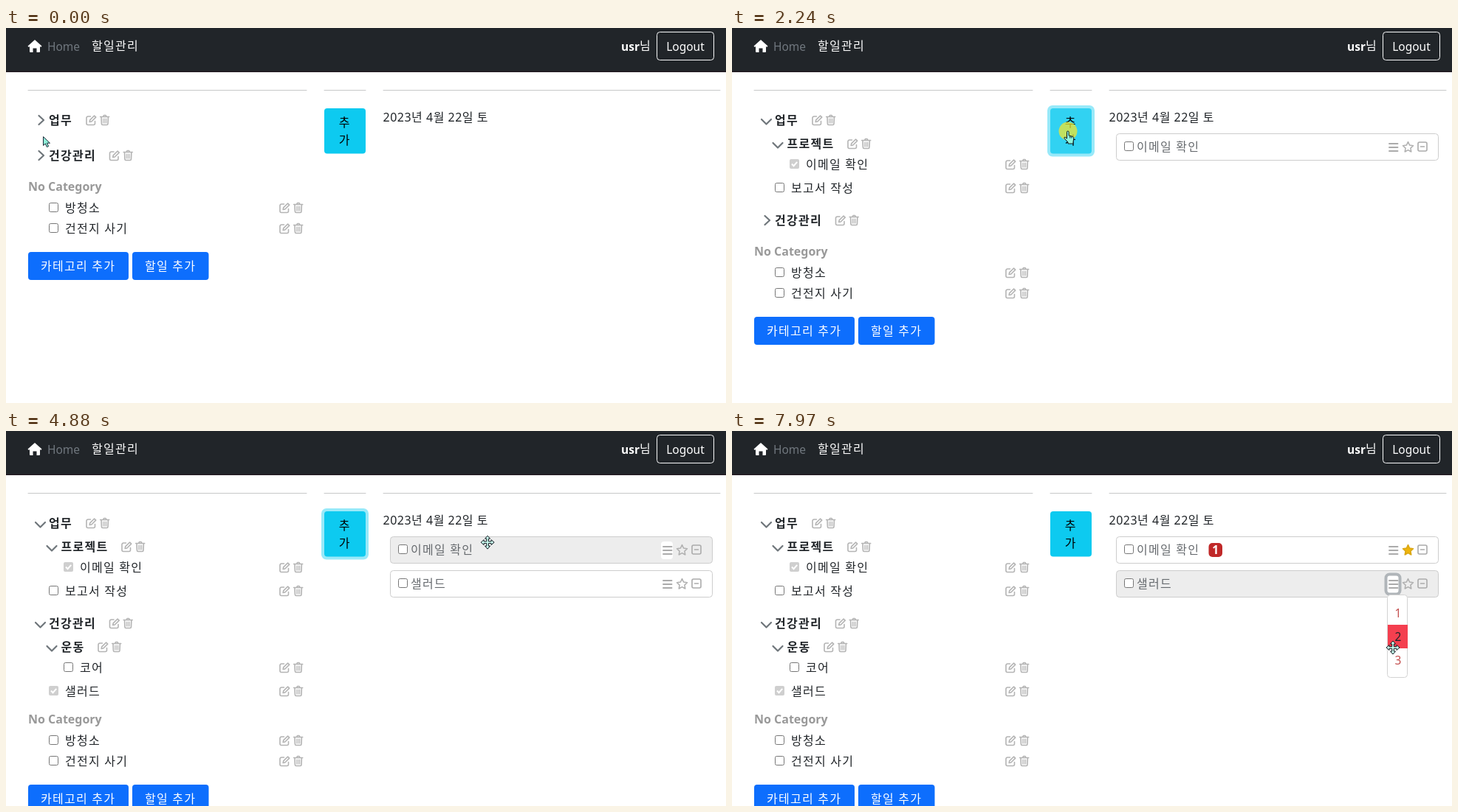
An HTML page for the animation above (8 s loop, 975 by 509 pixels).

```html
<!DOCTYPE html>
<html lang="ko">
<head>
<meta charset="utf-8">
<title>할일관리</title>
<style>
  html, body { margin: 0; width: 100%; height: 100%; overflow: hidden; background: #fff; }
  svg { display: block; width: 100vw; height: 100vh; }
  text { font: 16px "Noto Sans", "Noto Sans CJK KR", "Noto Sans CJK", sans-serif; letter-spacing: 1.25px; }
  text.latin { font-size: 15.5px; letter-spacing: 0; }
  text.plain { letter-spacing: 0; }
  text.date { letter-spacing: .5px; }
  text.bold { font-weight: 700; }
  .mid { text-anchor: middle; }
  .line { fill: none; stroke-linecap: round; stroke-linejoin: round; }
</style>
</head>
<body>
<svg viewBox="0 0 975 509">
  <defs>
    <g id="tools" class="line" stroke="#b4b4b4" stroke-width="1.6">
      <path d="M6.5 2.5H3a2 2 0 0 0-2 2V12a2 2 0 0 0 2 2h7.5a2 2 0 0 0 2-2V9"/>
      <path d="M5.2 10l.5-2.6L11.6 1.5l2.1 2.1-5.9 5.9z"/>
      <path d="M19.7 3h12M23.5 3l1-2h2.6l1 2M21 3l.4 9.5q.1 1.5 1.5 1.5h5.600q1.400 0 1.500-1.500L30.400 3"/>
      <path d="M23.7 5.500v6M25.7 5.500v6M27.7 5.500v6" stroke-width="1.1"/>
    </g>
    <path id="star" d="M0-7 2.1-2.4 7-1.8 3.4 1.6 4.3 6.5 0 4.1-4.3 6.5-3.4 1.6-7-1.8-2.1-2.4z" stroke-linejoin="round" stroke-width="1.5"/>
    <path id="arrow" d="M.5.5V12.5L3.3 10l2.1 4.6 2.2-1-2.1-4.4H9.5z" fill="#8ff0d8" stroke="#1c2b3a"/>
    <g id="hand" stroke="#101820">
      <path d="M-1.5 10V1.3a1.3 1.3 0 0 1 2.6 0V6l1.7.3 1.9.5 1.8.6q1.5.6 1.3 2.6L7 14.5V17H0v-2L-5 9.8q-.6-1.8 1.2-1.6z" fill="#8ff5dc"/>
      <path d="M2.8 6.5v3M5 7v2.5"/>
    </g>
    <path id="move" d="M0-9 3.5-5H1.3v3.7H5V-3.5L9 0 5 3.5V1.3H1.3V5h2.2L0 9l-3.500-4h2.200V1.300H-5v2.200L-9 0l4-3.500v2.200h3.700V-5h-2.200z" fill="#c9fbee" stroke="#101820"/>
  </defs>
  <g id="scene"></g>
</svg>
<script>
const LOOP = 8000;
const INK = '#212529', ICON = '#ababab';
const scene = document.getElementById('scene');

// Pointer path: time, x, y
const path = [
  [0, 50, 147], [100, 49, 143], [350, 46, 125], [830, 46, 125], [930, 48, 131], [1330, 87, 188],
  [1430, 85, 186], [1680, 86, 187], [2040, 455, 140], [2300, 455, 140], [2540, 330, 222],
  [2840, 62, 258], [3000, 45, 257], [3400, 45, 257], [3700, 64, 353], [3860, 64, 353],
  [4160, 403, 151], [4380, 455, 142], [4640, 455, 142], [5080, 800, 158], [5380, 917, 163],
  [5780, 917, 163], [5980, 897, 163], [6180, 897, 163], [6430, 901, 201], [6600, 901, 201],
  [6850, 899, 207], [6980, 897, 207], [7250, 897, 207], [7520, 900, 238], [7770, 899, 252], [7970, 895, 294]
];
const clicks = [400, 1440, 2140, 3030, 3740, 4480, 5450, 6080, 6480, 7080];

const ease = p => { p = Math.min(1, Math.max(0, p)); return p * p * (3 - 2 * p); };
const within = (t, from, to) => t >= from && t < to;
const inBox = (p, x, y, w, h) => p.x >= x && p.x <= x + w && p.y >= y && p.y <= y + h;

function pointerAt(t) {
  const i = path.findIndex(k => k[0] > t);
  const b = i < 0 ? path[path.length - 1] : path[i];
  const a = i < 0 ? b : path[i - 1];
  const p = i < 0 ? 0 : ease((t - a[0]) / (b[0] - a[0]));
  return { x: a[1] + (b[1] - a[1]) * p, y: a[2] + (b[2] - a[2]) * p };
}

const text = (x, cy, s, fill = INK, cls = '') =>
  `<text x="${x}" y="${cy + 6}" class="${cls}" fill="${fill}">${s}</text>`;
const rect = (x, y, w, h, fill, r = 0, more = '') =>
  `<rect x="${x}" y="${y}" width="${w}" height="${h}" rx="${r}" fill="${fill}" ${more}/>`;
const line = (d, color, width) =>
  `<path class="line" d="${d}" stroke="${color}" stroke-width="${width}"/>`;
const use = (id, x, y, more = '') => `<use href="#${id}" x="${x}" y="${y}" ${more}/>`;
const tools = (x, cy) => use('tools', x, cy - 7.5);

function checkbox(x, cy, state) {
  const color = { on: '#4d9148', off: '#cfcfcf' }[state];
  if (!color) return rect(x + .5, cy - 6, 12, 12, '#fff', 2, 'stroke="#767676"');
  return rect(x, cy - 6.5, 13, 13, color, 2) +
    `<path d="M${x + 3} ${cy}l2.5 2.7 4.7-5.4" fill="none" stroke="#fff" stroke-width="2"/>`;
}

const task = (x, cy, name, state) =>
  checkbox(x, cy - .5, state) + text(x + 22, cy, name) + tools(370, cy);

const chevron = (x, cy, open) =>
  line(open ? `M${x - 3.5} ${cy - 1}l6.5 6.5 6.5-6.5` : `M${x + 1} ${cy - 6}l6.5 6-6.5 6`, '#6f767b', 2.2);

function category(cy, name, width, open, focus, pointer) {
  const hover = inBox(pointer, 30, cy - 16, width, 32);
  return (focus ? rect(26, cy - 20, width + 8, 40, '#c2d8fb', 7) : '') +
    (focus || hover ? rect(30, cy - 16, width, 32, '#dcdcdc', 4) : '') +
    chevron(43.5, cy, open) + text(58, cy, name, INK, 'bold') + tools(width + 38, cy);
}

function children(id, top, height, content) {
  if (height <= 0) return '';
  return `<clipPath id="${id}">${rect(0, top, 420, height + 4, '#000')}</clipPath><g clip-path="url(#${id})">${content}</g>`;
}

const subcategory = (cy, name, toolX) =>
  chevron(59, cy, true) + text(74.5, cy, name, INK, 'bold') + tools(toolX, cy);

function planRow(cy, name, { hover, starred, badge, focus }) {
  const bars = [-5, 0, 5].map(d => `M890 ${cy + 1 + d}h11.5`).join('');
  return rect(520.5, cy - 17.5, 436, 36, hover ? '#ededed' : '#fff', 4, 'stroke="#cdcdcd"') +
    checkbox(531, cy - .5) + text(548, cy, name, '#666a6e') +
    (focus ? rect(885.5, cy - 12.5, 19, 27, '#fff', 5, 'stroke="#b0b5b9" stroke-width="4"')
           : hover ? rect(887, cy - 11, 16, 24, '#fff', 4) : '') +
    line(bars, ICON, 1.9) +
    use('star', 915.5, cy + .5, starred ? 'fill="#efb50c" stroke="#d9a614"' : 'fill="none" stroke="#b0b0b0"') +
    rect(929, cy - 6, 12, 12, 'none', 2, `stroke="${ICON}" stroke-width="1.6"`) + line(`M932.5 ${cy}h5`, ICON, 1.6) +
    (badge ? rect(645.5, cy - 9, 18.5, 19, '#c02828', 5) + text(654.7, cy, badge, '#fff', 'latin bold mid') : '');
}

function priorityMenu(rowY, pointer) {
  const top = rowY + 15;
  let out = rect(887.5, top + .5, 27, 112, '#fff', 4, 'stroke="#d3d3d3"');
  for (let i = 0; i < 3; i++) {
    const y = top + 9 + 32 * i;
    const hover = pointer.y >= y && pointer.y < y + 32;
    if (hover) out += rect(888, y, 27, 32, '#f43f4f');
    out += text(902, y + 16, i + 1, hover ? INK : '#c4504f', 'latin mid');
  }
  return out;
}

function header() {
  return rect(0, 0, 975, 60, INK) + rect(0, 58.5, 975, 1.5, '#251b22') +
    '<path d="M39 16l9.5 8.5-1.3 1.4-1.2-.9v7q0 1-1 1h-3.5v-5.5h-5V33H33q-1 0-1-1v-7l-1.2.9-1.3-1.4z" fill="#fff"/>' +
    text(56, 25, 'Home', '#70777e', 'latin') + text(116, 24, '할일관리', '#fff') +
    text(833, 25, 'usr', '#fff', 'latin bold') + text(858, 24, '님', '#fff') +
    rect(881.5, 5.5, 77, 38, 'none', 4, 'stroke="#f8f9fa"') + text(920, 25, 'Logout', '#fff', 'latin mid') +
    line('M30 84.5H407M431 84.5H487M511 84.5H967', '#c7c8c9', 1);
}

function taskTree(t, pointer) {
  const workOpen = 88 * ease((t - 470) / 350), healthOpen = 88 * ease((t - 3080) / 300);
  const health = 173 + workOpen, rest = health + 42 + healthOpen;
  const email = t < 1500 ? '' : t < 2240 ? 'on' : 'off';
  const salad = t < 3800 ? '' : t < 4580 ? 'on' : 'off';
  return category(125, '업무', 70, workOpen > 0, within(t, 400, 1440), pointer) +
    children('work', 141, workOpen,
      subcategory(157, '프로젝트', 156) + task(78, 185, '이메일 확인', email) + task(58, 217, '보고서 작성')) +
    category(health, '건강관리', 101.5, healthOpen > 0, within(t, 3030, 3740), pointer) +
    children('health', health + 16, healthOpen,
      subcategory(293, '운동', 124) + task(78, 321, '코어') + task(58, 353, '샐러드', salad)) +
    text(30, rest, 'No Category', '#999', 'plain bold') +
    task(58, rest + 29, '방청소') + task(58, rest + 57, '건전지 사기') +
    rect(30, rest + 89, 136, 38, '#0d6efd', 4) + text(47, rest + 108, '카테고리 추가', '#fff') +
    rect(171, rest + 89, 103.5, 38, '#0d6efd', 4) + text(188, rest + 108, '할일 추가', '#fff');
}

function addButton(t, pointer) {
  const focus = within(t, 2140, 3030) || within(t, 4480, 5450);
  const hover = inBox(pointer, 431, 109, 56, 61);
  return (focus ? rect(427, 105, 64, 69.5, '#98e9f9', 7) : '') +
    rect(431, 109, 56, 61.5, hover ? '#31d2f2' : '#0dcaf0', 4) +
    text(458.7, 127.5, '추', '#000', 'mid') + text(458.7, 151.5, '가', '#000', 'mid');
}

function plan(t, pointer) {
  const menu = within(t, 6160, 6570) ? 161 : t >= 7160 ? 207 : 0;
  const hovered = cy => menu ? menu === cy : inBox(pointer, 520, cy - 18, 437, 37);
  let out = text(510.5, 121, '2023년 4월 22일 토', INK, 'date');
  if (t >= 2240) out += planRow(161, '이메일 확인', {
    hover: hovered(161), starred: t >= 5580, badge: t >= 6570 && 1, focus: within(t, 6080, 6570)
  });
  if (t >= 4580) out += planRow(207, '샐러드', { hover: hovered(207), focus: t >= 7080 });
  return out + (menu ? priorityMenu(menu, pointer) : '');
}

function pointerShape(t, p) {
  const health = t < 470 ? 173 : 261;
  const onRow = (t >= 2240 && inBox(p, 520, 143, 437, 37)) || (t >= 4580 && inBox(p, 520, 189, 437, 36));
  if (inBox(p, 30, 109, 70, 32) || inBox(p, 30, health - 16, 101, 32) || inBox(p, 431, 109, 56, 61)) return 'hand';
  if (onRow) return p.x > 886 ? 'hand' : 'move';
  return p.x > 886 ? 'move' : 'arrow';
}

function draw(t) {
  const p = pointerAt(t);
  const pressed = clicks.some(c => within(t, c, c + 180));
  scene.innerHTML = header() + taskTree(t, p) + addButton(t, p) + plan(t, p) +
    (pressed ? `<circle cx="${p.x}" cy="${p.y}" r="12.5" fill="#f2e52f" opacity=".75"/>` : '') +
    use(pointerShape(t, p), p.x, p.y);
}

function tick(now) {
  draw(now % LOOP);
  requestAnimationFrame(tick);
}
draw(0);
requestAnimationFrame(tick);
</script>
</body>
</html>
```
